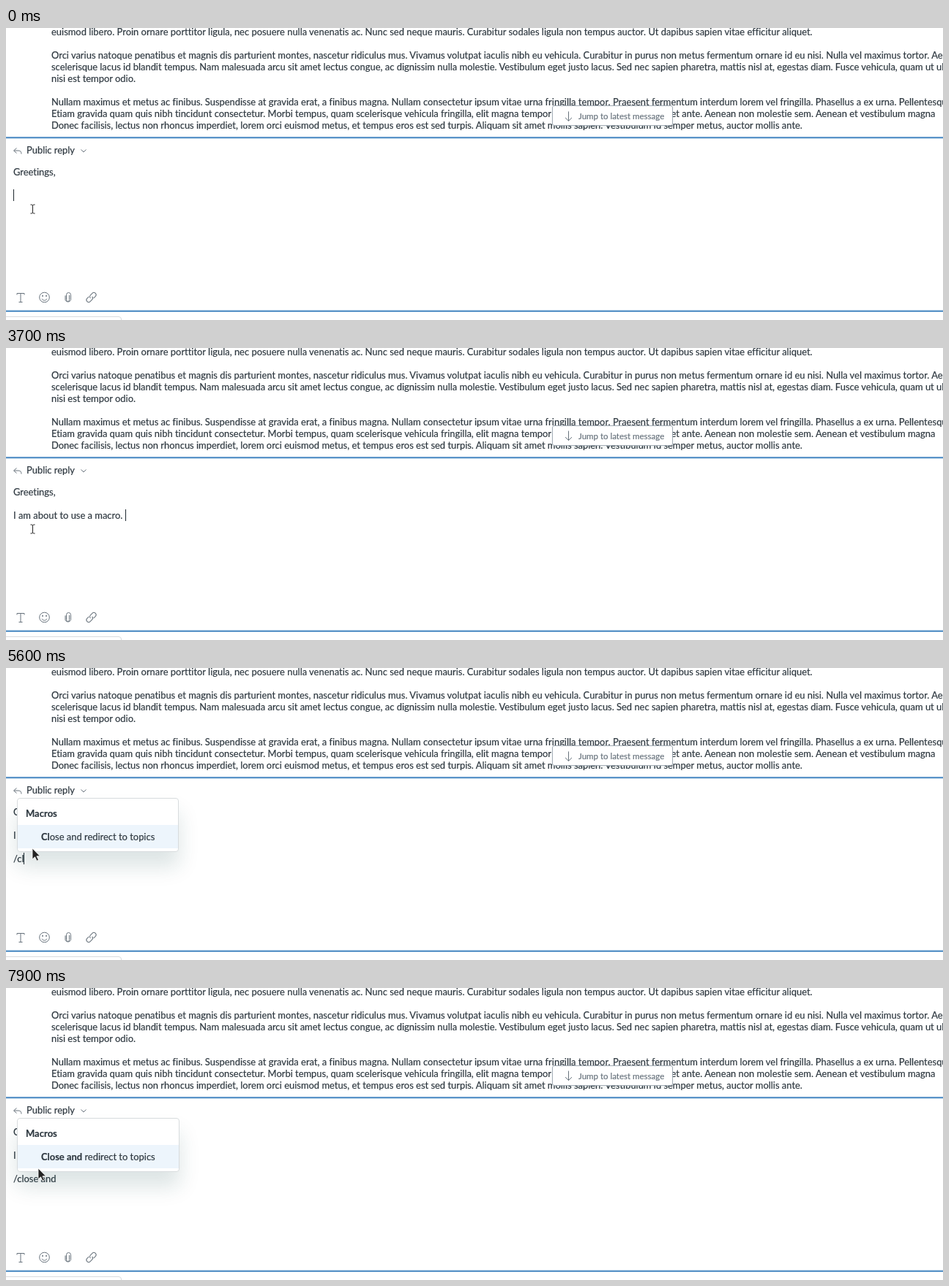
An HTML page that plays this animation: 1280 by 400 pixels, repeating every 8 s.

```html
<!DOCTYPE html>
<html lang="en">
<head>
<meta charset="utf-8">
<title>Macro reply</title>
<style>
html, body { margin: 0; width: 100%; height: 100%; overflow: hidden; background: #fff; }
body { position: relative; font: 12.93px/16px Lato, "Open Sans", sans-serif; font-variant-ligatures: none; -webkit-text-stroke: .2px; color: #2f3941; white-space: pre; }
body > *, .menu { position: absolute; }
svg { left: 0; top: 0; width: 1280px; height: 400px; fill: none; stroke: #68737d; }
.msg { left: 62px; top: -3px; width: 1218px; overflow: hidden; }
.jump { left: 746px; top: 106px; width: 163px; height: 26px; border: 1px solid #a3adb6; border-radius: 3px; background: #fff; color: #68737d; font-size: 11.5px; line-height: 27px; text-indent: 35px; box-shadow: 0 2px 4px rgba(23, 73, 77, .08); }
.edge { left: 0; width: 100%; height: 2px; background: #5a94c8; box-shadow: 0 1px #c4daec; }
.edge.low { box-shadow: 0 -1px #c4daec; }
.tab { left: -5px; top: 395px; width: 161px; height: 20px; border: 1px solid #d8dcde; border-radius: 4px; }
.line { left: 10px; }
.caret { display: inline-block; width: 1px; height: 16px; margin-right: -1px; vertical-align: top; background: #1f2930; }
.menu { box-sizing: border-box; border: 1px solid #d8dcde; border-radius: 4px; padding: 4px 0; background: #fff; box-shadow: 0 20px 28px rgba(23, 73, 77, .15); line-height: 32px; }
.menu h4 { margin: 0; padding-left: 11px; font-size: 13px; }
.menu div { padding: 0 32px; }
.menu div:nth-child(2) { background: #edf5fc; }
.menu small { display: block; margin: -8px 0 6px; font-size: 11px; line-height: 16px; color: #68737d; }
#down { animation: bob 1400ms -850ms ease-in-out infinite; }
@keyframes bob { 0%, 100% { transform: translateY(-1px); } 50% { transform: translateY(1px); } }
</style>
</head>
<body>
<div class="msg">euismod libero. Proin ornare porttitor ligula, nec posuere nulla venenatis ac. Nunc sed neque mauris. Curabitur sodales ligula non tempus auctor. Ut dapibus sapien vitae efficitur aliquet.

Orci varius natoque penatibus et magnis dis parturient montes, nascetur ridiculus mus. Vivamus volutpat iaculis nibh eu vehicula. Curabitur in purus non metus fermentum ornare id eu nisi. Nulla vel maximus tortor. Aenean
scelerisque lacus id blandit tempus. Nam malesuada arcu sit amet lectus congue, ac dignissim nulla molestie. Vestibulum eget justo lacus. Sed nec sapien pharetra, mattis nisl at, egestas diam. Fusce vehicula, quam ut ultrices
nisi est tempor odio.

Nullam maximus et metus ac finibus. Suspendisse at gravida erat, a finibus magna. Nullam consectetur ipsum vitae urna fringilla tempor. Praesent fermentum interdum lorem vel fringilla. Phasellus a ex urna. Pellentesque
Etiam gravida quam quis nibh tincidunt consectetur. Morbi tempus, quam scelerisque vehicula fringilla, elit magna tempor nunc, quis porta vitae nisi eget ante. Aenean non molestie sem. Aenean et vestibulum magna
Donec facilisis, lectus non rhoncus imperdiet, lorem orci euismod metus, et tempus eros est sed turpis. Aliquam sit amet mollis sapien. Vestibulum id semper metus, auctor mollis ante.</div>
<div class="jump">Jump to latest message</div>
<div class="edge" style="top:149px"></div>
<div class="edge low" style="top:387px"></div>
<div class="tab"></div>
<div class="line" style="left:28px;top:159px">Public reply</div>
<div class="line" style="top:189px">Greetings,</div>
<div class="line" id="first" style="top:221px"></div>
<div class="line" id="second" style="top:253px"></div>
<svg viewBox="0 0 1280 400">
  <path id="down" d="M768.5 113.5v13M764 122l4.5 4.5 4.5-4.5"/>
  <path d="M14.5 164.5l-4 3.5 4 3.5M11 168h6q4 0 4 4.5"/>
  <path d="M102.5 166.5l3.5 3.5 3.5-3.5"/>
  <path d="M15 365.5v-2h10v2M20 363.5v12M17.5 375.5h5"/>
  <circle cx="52.5" cy="369" r="6.8"/>
  <path d="M48.8 371q3.7 4.5 7.4 0"/>
  <path d="M50 366v2M55 366v2" stroke-width="1.5"/>
  <path d="M86.5 366v6.500a2 2 0 0 1-4 0v-7a3 3 0 0 1 6 0v7a4 4 0 0 1-7.500 0v-6"/>
  <g transform="translate(116.5 369) rotate(-45)">
    <path d="M-1.5-3h-3.5a3 3 0 0 0 0 6h3.5a3 3 0 0 0 3-3M1.5 3h3.5a3 3 0 0 0 0-6h-3.5a3 3 0 0 0-3 3"/>
  </g>
</svg>
<div id="menu" class="menu"></div>
<svg viewBox="0 0 1280 400">
  <path id="beam" stroke="#222" d="M33.5 242h2l1 1 1-1h2M36.5 243v10M33.5 254h2l1-1 1 1h2"/>
  <path id="arrow" fill="#222" stroke="#fff" stroke-width=".8" d="M36 247v15l3.5-3.2 2.6 5.4 2.4-1.2-2.6-5.2h4.6z"/>
</svg>
<script>
const LOOP = 8000, BLINK = 600, ENTER = 4500, MENU = 4800;
const $ = id => document.getElementById(id);
const lines = [
  { el: $("first"), text: "I am about to use a macro. ", keys: [400, 500, 700, 1000, 1100, 1200, 1400, 1500, 1600,
    1700, 1800, 1900, 2000, 2100, 2150, 2200, 2300, 2400, 2600, 2700, 2900, 3100, 3200, 3250, 3300, 3500, 3600] },
  { el: $("second"), text: "/close and ", keys: [4700, 5300, 5500, 5800, 5900, 6000, 6100, 6200, 6400, 6600, 6800] }
];
const presses = [0, ENTER, ...lines.flatMap(l => l.keys)];
const macros = ["Close and redirect to topics", "Create discussion issue", "Customer not responding",
  "Downgrade and inform", "Document This", "Take it!"];
let shown;

function menuHtml(query) {
  const n = query.length;
  return "<h4>Macros</h4>" + macros.filter(m => m.toLowerCase().startsWith(query)).map(m =>
    `<div><b>${m.slice(0, n)}</b>${m.slice(n)}${m === "Document This" ? "<small>General</small>" : ""}</div>`).join("");
}

function draw() {
  const t = performance.now() % LOOP;
  const last = Math.max(...presses.filter(p => p <= t));
  const on = Math.floor((t - last) / BLINK) % 2 === 0;
  const typed = lines.map(l => l.text.slice(0, l.keys.filter(k => k <= t).length));
  const row = t < ENTER ? 0 : 1;
  const open = t >= MENU;
  const state = typed.join("|") + row + on + open;

  if (state !== shown) {
    shown = state;
    lines.forEach((l, i) => {
      l.el.innerHTML = typed[i] + (i === row && on ? '<i class="caret"></i>' : "");
    });
    const query = typed[1].slice(1).trim();
    const menu = $("menu");
    menu.innerHTML = open ? menuHtml(query) : "";
    menu.style.display = open ? "block" : "none";
    menu.style.left = (query ? 15 : 10) + "px";
    menu.style.bottom = "148px";
    $("beam").style.display = open ? "none" : "";
    $("arrow").style.display = open ? "" : "none";
  }
  const p = Math.min(1, Math.max(0, (t - 7000) / 500));
  $("arrow").setAttribute("transform", `translate(${8 * p * p * (3 - 2 * p)} 0)`);
  requestAnimationFrame(draw);
}
draw();
</script>
</body>
</html>
```
